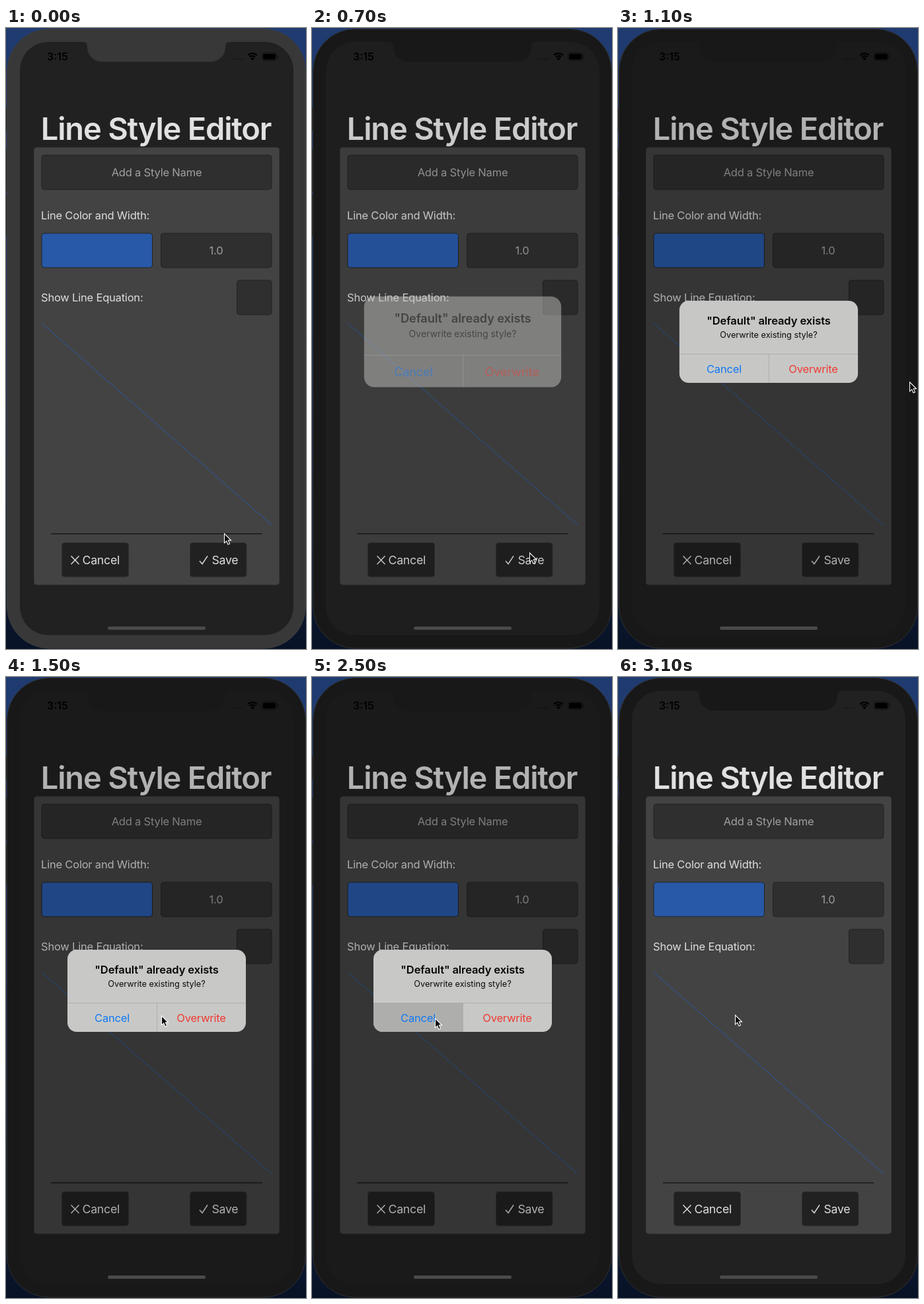
Recreate the animation shown at these times as an HTML page with a canvas. Size 454 by 938 pixels, loop 3.2 s.

```html
<!DOCTYPE html>
<html lang="en">
<head>
<meta charset="utf-8">
<title>Line Style Editor</title>
<style>
  html, body { margin: 0; width: 100%; height: 100%; overflow: hidden; background: #10203f; }
  canvas { display: block; }
</style>
</head>
<body>
<canvas id="stage" width="454" height="938"></canvas>
<script>
const ctx = document.getElementById("stage").getContext("2d");
const LOOP = 3200, STEP = 100;
const SANS = "Inter, Roboto, sans-serif";

// Pointer positions: [time, x, y]; the pointer rests between entries over 100 ms apart.
const pointerPath = [
  [0, 330, 763], [100, 329, 784], [200, 328, 802], [700, 329, 792],
  [800, 335, 742], [900, 352, 697], [1000, 399, 615], [1100, 441, 534],
  [1200, 432, 521], [1300, 360, 516], [1400, 283, 514], [1500, 235, 511],
  [1600, 235, 513], [1800, 225, 513], [1900, 213, 513], [2000, 201, 513],
  [2100, 175, 514], [2200, 186, 515], [2700, 170, 505], [2800, 130, 480],
  [2900, 96, 457], [3000, 186, 505], [3100, 177, 510]
];

// Remaining distance of a critically damped spring.
function spring(ms) {
  if (ms <= 0) return 1;
  const x = ms * 0.016;
  return (1 + x) * Math.exp(-x);
}

function roundRect(x, y, w, h, r, fill, stroke) {
  ctx.beginPath();
  ctx.roundRect(x, y, w, h, r);
  if (fill) { ctx.fillStyle = fill; ctx.fill(); }
  if (stroke) { ctx.strokeStyle = stroke; ctx.lineWidth = 1; ctx.stroke(); }
}

function rect(x, y, w, h, color) {
  ctx.fillStyle = color;
  ctx.fillRect(x, y, w, h);
}

function polyline(points, color, width) {
  ctx.beginPath();
  points.forEach(([x, y]) => ctx.lineTo(x, y));
  ctx.strokeStyle = color;
  ctx.lineWidth = width;
  ctx.stroke();
}

function label(text, x, y, color, { size = 16.5, weight = 400, align = "left", spacing = -0.2 } = {}) {
  ctx.font = `${weight} ${size}px ${SANS}`;
  ctx.letterSpacing = spacing + "px";
  ctx.textAlign = align;
  ctx.fillStyle = color;
  ctx.fillText(text, x, y);
}

const centered = { align: "center" };

function drawDesktop() {
  const sky = ctx.createLinearGradient(0, 0, 0, 938);
  sky.addColorStop(0, "#1f3b70");
  sky.addColorStop(0.5, "#1a3566");
  sky.addColorStop(1, "#081226");
  rect(0, 0, 454, 938, sky);
  rect(450, 100, 4, 738, "#0c1424");
}

function drawBody(color, edge) {
  for (const [y, h] of [[120, 35], [183, 64], [251, 64]]) rect(0, y, 4, h, "#1d1f24");
  roundRect(1.5, 1.5, 452, 935.5, 64, color, edge);
  roundRect(21, 21, 414, 896, 43, "#212121");
}

function drawNotch(color) {
  ctx.beginPath();
  ctx.moveTo(117, 20);
  ctx.lineTo(117, 21);
  ctx.quadraticCurveTo(123, 21, 123, 28);
  ctx.arcTo(123, 51, 146, 51, 22);
  ctx.arcTo(332, 51, 332, 28, 22);
  ctx.lineTo(332, 28);
  ctx.quadraticCurveTo(332, 21, 338, 21);
  ctx.lineTo(338, 20);
  ctx.fillStyle = color;
  ctx.fill();
}

function drawStatusBar() {
  label("3:15", 62, 49, "#000", { size: 16, weight: 600, spacing: 0 });
  for (let i = 0; i < 4; i++) {
    ctx.beginPath();
    ctx.arc(342.5 + i * 4.8, 47, 1.5, 0, 7);
    ctx.fillStyle = "#191919";
    ctx.fill();
  }
  const from = -Math.PI * 0.75, to = -Math.PI * 0.25;
  for (const radius of [9.6, 5.8]) {
    ctx.beginPath();
    ctx.arc(373, 48, radius, from, to);
    ctx.strokeStyle = "#000";
    ctx.lineWidth = 2.4;
    ctx.stroke();
  }
  ctx.beginPath();
  ctx.moveTo(373, 49);
  ctx.arc(373, 49, 4, from, to);
  ctx.fillStyle = "#000";
  ctx.fill();
  roundRect(387.5, 37.5, 22, 11.5, 3.5, null, "#111");
  roundRect(389, 39, 19, 8.5, 2, "#000");
  roundRect(410.5, 41.5, 1.5, 4, 1, "#111");
}

function drawEditor(saveAlpha) {
  label("Line Style Editor", 227, 169, "#e1e1e1",
    { size: 47, weight: 600, align: "center", spacing: -1.2 });
  roundRect(42.5, 180.5, 371, 660.5, 4, "#434343", "#373737");

  const field = (x, y, w, h, fill) => roundRect(x + 0.5, y + 0.5, w, h, 4, fill, "#222");
  field(53.5, 191.5, 348, 52, "#2f2f2f");
  field(53.5, 309.5, 167.5, 52, "#2859a8");
  field(234, 309.5, 167.5, 52, "#2f2f2f");
  field(349, 380.5, 52.5, 52, "#2f2f2f");
  label("Add a Style Name", 228, 224, "#a0a0a0", centered);
  label("1.0", 318, 342, "#a0a0a0", centered);
  label("Line Color and Width:", 53, 289, "#dedede");
  label("Show Line Equation:", 53, 413, "#dedede");

  polyline([[54, 446], [402.5, 751]], "#2859a8", 1);
  rect(68, 763, 319.5, 2, "#232323");

  roundRect(84.5, 777.5, 101, 51.5, 4, "#212121", "#303030");
  roundRect(278.5, 777.5, 85.5, 51.5, 4, "#212121", "#303030");
  polyline([[98.5, 797.5], [110.5, 810]], "#dedede", 1.4);
  polyline([[110.5, 797.5], [98.5, 810]], "#dedede", 1.4);
  const button = { size: 17.7, spacing: -0.25 };
  label("Cancel", 115.5, 810, "#dedede", button);
  ctx.globalAlpha = saveAlpha;
  polyline([[293, 805], [297, 809.5], [305, 797.5]], "#dedede", 1.4);
  label("Save", 311.5, 810, "#dedede", button);
  ctx.globalAlpha = 1;
}

function drawAlert(alpha, scale, highlight) {
  ctx.save();
  ctx.globalAlpha = alpha;
  ctx.translate(228, 474);
  ctx.scale(scale, scale);
  ctx.translate(-228, -474);
  roundRect(93, 412, 270, 124, 14, "#c8c9c7");
  if (highlight) {
    ctx.globalAlpha = alpha * highlight;
    roundRect(93, 492, 135, 44, [0, 0, 0, 14], "#aeafad");
    ctx.globalAlpha = alpha;
  }
  rect(93, 492, 270, 0.8, "#a9aaa8");
  rect(228, 492, 0.8, 44, "#a9aaa8");
  label('"Default" already exists', 228, 448, "#050505",
    { weight: 600, align: "center", spacing: -0.1 });
  label("Overwrite existing style?", 228, 468, "#0a0a0a",
    { size: 12.7, align: "center", spacing: 0 });
  label("Cancel", 160.5, 521, "#1278f2", centered);
  label("Overwrite", 295.5, 521, "#f03a33", centered);
  ctx.restore();
}

function drawPointer(t) {
  const [, x, y] = pointerPath.findLast(p => p[0] <= t);
  ctx.save();
  ctx.translate(x + 0.5, y + 0.8);
  ctx.beginPath();
  for (const [px, py] of [[0, 0], [0, 14], [3.2, 11.1], [5.4, 16.2], [8, 15.1], [5.8, 10.1], [10, 10]])
    ctx.lineTo(px, py);
  ctx.closePath();
  ctx.fillStyle = "#080808";
  ctx.fill();
  ctx.strokeStyle = "#fff";
  ctx.lineWidth = 1.1;
  ctx.stroke();
  ctx.restore();
}

function saveOpacity(t) {
  if (t < 400 || t >= 700) return 1;
  return t < 500 ? 0.65 : t < 600 ? 0.38 : 0.6;
}

function draw(t) {
  const offset = spring(t - 600);
  const shown = t >= 2900 ? 0 : t > 2600 ? spring(t - 2600) : 1 - offset;
  const highlight = t < 2400 || t >= 2700 ? 0 : t < 2500 ? 0.7 : t < 2600 ? 1 : 0.5;
  const active = t < 400;
  const bodyColor = active ? "#383838" : "#181818";

  drawDesktop();
  drawBody(bodyColor, active ? "#3e3e3e" : "#303030");
  drawStatusBar();
  drawEditor(saveOpacity(t));
  if (shown > 0) roundRect(21, 21, 414, 896, 43, `rgba(0,0,0,${0.21 * shown})`);
  drawNotch(bodyColor);
  roundRect(154, 904, 148, 5, 2.5, "#4a4a4a");
  if (shown > 0) drawAlert(shown, t < 2600 ? 1 + 0.2 * offset : 1, highlight);
  drawPointer(t);
}

function tick() {
  const t = performance.now() % LOOP;
  draw(Math.floor(t / STEP) * STEP);
  requestAnimationFrame(tick);
}
tick();
</script>
</body>
</html>
```
